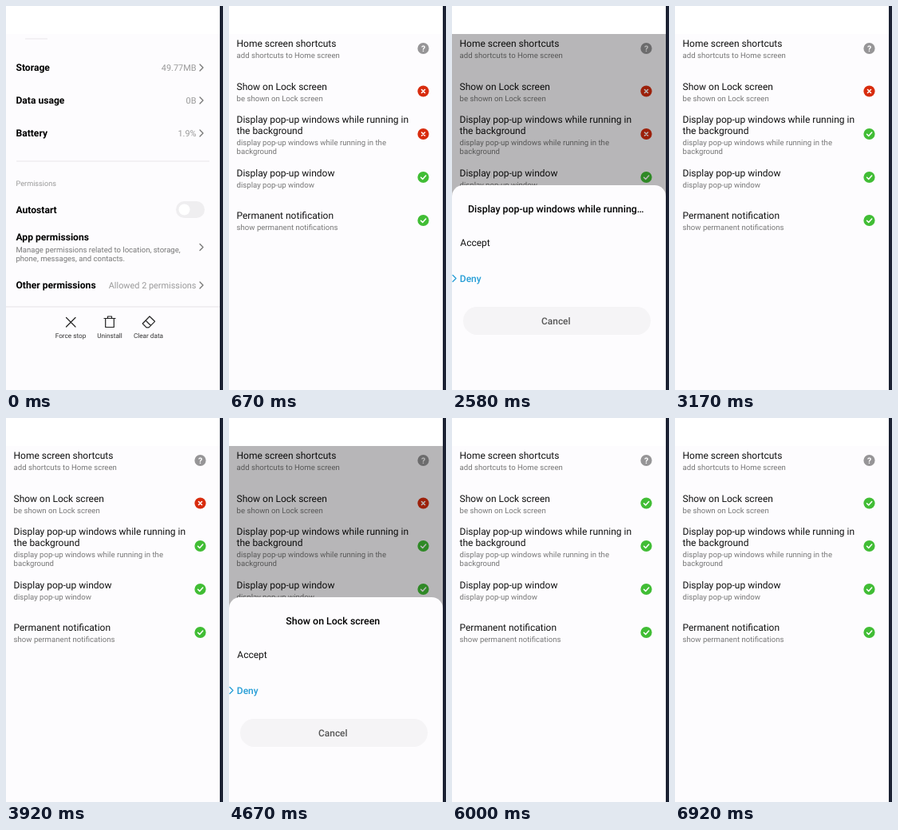
An HTML page for the animation above (7.01 s loop, 272 by 480 pixels).

```html
<!DOCTYPE html>
<html lang="en">
<head>
<meta charset="utf-8">
<title>App permissions</title>
<style>
html, body { margin: 0; width: 100%; height: 100%; overflow: hidden; background: #fff; }
svg { display: block; width: 272px; height: 480px; font-family: Roboto, sans-serif; text-rendering: geometricPrecision; }
.line { fill: none; stroke-width: 1.2; stroke-linecap: round; stroke-linejoin: round; }
</style>
</head>
<body>
<svg viewBox="0 0 272 480">
  <defs><clipPath id="view"><rect y="35" width="268" height="445"/></clipPath></defs>
  <rect width="272" height="480" fill="#fff"/>
  <g clip-path="url(#view)">
    <g id="info"></g>
    <g id="list"></g>
    <rect id="dim" y="35" width="268" height="445"/>
    <g id="sheet"></g>
  </g>
  <rect x="268" width="4" height="480" fill="#1b2132"/>
</svg>
<script>
const FRAME = 1000 / 12, LOOP = 7010;
const PAPER = '#fdfcfe', INK = '#111', GREY = '#777', PALE = '#999', BLUE = '#259dd6';
const $ = id => document.getElementById(id);

function add(parent, tag, attrs, text) {
  const el = document.createElementNS('http://www.w3.org/2000/svg', tag);
  for (const key in attrs) el.setAttribute(key, attrs[key]);
  if (text) el.textContent = text;
  return parent.appendChild(el);
}
const label = (p, x, y, text, size, fill = INK, weight = 400, anchor = 'start') =>
  add(p, 'text', { x, y, fill, 'font-size': size, 'font-weight': weight, 'text-anchor': anchor }, text);
const box = (p, x, y, width, height, fill, rx = 0) =>
  add(p, 'rect', { x, y, width, height, fill, rx });
const line = (p, d, stroke, width = 1.2) =>
  add(p, 'path', { d, stroke, class: 'line', style: `stroke-width:${width}` });
const chevron = (p, x, y, color) => line(p, `M${x} ${y - 4}l4 4-4 4`, color, 1.3);

function buildInfo(p) {
  box(p, 0, 35, 268, 445, PAPER);
  box(p, 24, 40.5, 28, 1, '#e9e7eb');
  const rows = [['Storage', 77, '49.77MB'], ['Data usage', 118, '0B'], ['Battery', 159, '1.9%'],
    ['Autostart', 255], ['App permissions', 289], ['Other permissions', 349, 'Allowed 2 permissions']];
  for (const [name, y, value] of rows) {
    label(p, 12.5, y + 4.3, name, 12.1, '#000', 700);
    if (!value) continue;
    label(p, 238.5, y + 4, value, 10.9, PALE, 400, 'end');
    chevron(p, 243, y, '#777');
  }
  box(p, 13, 193.5, 242, 1, '#e9e7eb');
  label(p, 12.5, 225.3, 'Permissions', 9.15, PALE);
  box(p, 213, 244, 36, 21, '#efeef0', 10.5);
  add(p, 'circle', { cx: 223.5, cy: 254.5, r: 7, fill: '#fff' });
  label(p, 12.5, 308.3, 'Manage permissions related to location, storage,', 9.55, GREY);
  label(p, 12.5, 319.3, 'phone, messages, and contacts.', 9.55, GREY);
  chevron(p, 243, 301.5, '#777');
  box(p, 0, 375.5, 268, 1, '#e6e4e8');
  line(p, 'M75.5 389.5l11.5 11.5M87 389.5l-11.5 11.5', '#222');
  line(p, 'M123 390.5h14M127.5 390v-2h5v2M124.7 391v10.5h10.6v-10.5', '#222');
  line(p, 'M180 388l6.5 6.3-7.5 7.5h-3l-4.8-4.8zM175 393l6.5 6.5', '#222');
  [['Force stop', 81], ['Uninstall', 130], ['Clear data', 178.5]].forEach(([text, x]) =>
    label(p, x, 415, text, 8.2, '#333', 400, 'middle'));
}

function badge(p, y, kind) {
  const g = add(p, 'g', { transform: `translate(243.5 ${y})` });
  const color = { ask: '#969597', no: '#d82c0e', yes: '#41bd35' }[kind];
  add(g, 'circle', { r: 7.1, fill: color });
  if (kind === 'ask') label(g, 0, 3.7, '?', 10.5, '#fff', 700, 'middle');
  if (kind === 'no') line(g, 'M-2 -2l4 4M2 -2l-4 4', '#fff', 1.6);
  if (kind === 'yes') line(g, 'M-3 .2l2.2 2.2 4-4.4', '#fff', 1.5);
  return g;
}

function buildList(p) {
  box(p, 0, 35, 268, 445, PAPER);
  const press = [box(p, 0, 133, 268, 55, '#ebeaec'), box(p, 0, 79, 268, 54, '#ebeaec')];
  const rows = [
    [51.2, ['Home screen shortcuts'], ['add shortcuts to Home screen']],
    [104.8, ['Show on Lock screen'], ['be shown on Lock screen']],
    [146.2, ['Display pop-up windows while running in', 'the background'],
      ['display pop-up windows while running in the', 'background']],
    [212.7, ['Display pop-up window'], ['display pop-up window']],
    [266, ['Permanent notification'], ['show permanent notifications']]];
  for (const [y, title, note] of rows) {
    title.forEach((text, i) => label(p, 9.5, y + 14 * i, text, 12));
    const top = y + 14 * title.length;
    note.forEach((text, i) => label(p, 9.6, top + 11 * i, text, 9.6, GREY));
  }
  badge(p, 53, 'ask');
  badge(p, 214, 'yes');
  badge(p, 268, 'yes');
  const marks = [160, 106.5].map(y => [badge(p, y, 'no'), badge(p, y, 'yes')]);
  return { press, marks };
}

function buildSheet(p) {
  box(p, 0, 224, 268, 300, PAPER, 14);
  const press = box(p, 0, 272.5, 268, 45.5, '#f1f0f2');
  const title = label(p, 130.3, 258, '', 12.4, '#000', 500, 'middle');
  label(p, 10.3, 300.3, 'Accept', 12);
  label(p, 9.8, 345.3, 'Deny', 12, BLUE, 500);
  chevron(p, 1, 340.5, BLUE);
  box(p, 14, 376, 235, 35, '#f5f4f6', 17.5);
  label(p, 130.3, 397.8, 'Cancel', 11.9, '#555', 500, 'middle');
  return { press, title };
}

buildInfo($('info'));
const list = buildList($('list'));
const sheet = buildSheet($('sheet'));

// Times in ticks of 1/12 s.
const visits = [
  { title: 'Display pop-up windows while running…', tap: 19, open: 21, accept: 33, close: 35 },
  { title: 'Show on Lock screen', tap: 52, open: 53, accept: 64, close: 66 }];

const ramp = (t, from, to) => Math.min(1, Math.max(0, (t - from) / (to - from)));
const easeOut = p => 1 - (1 - p) ** 2.4;
const show = (el, on) => el.setAttribute('visibility', on ? 'visible' : 'hidden');
const move = (el, x, y) => el.setAttribute('transform', `translate(${x} ${y})`);

function draw(ms) {
  const t = Math.floor((ms % LOOP + 3.5) / FRAME);
  const slide = easeOut(ramp(t, 0, 4));
  move($('info'), -67 * slide, 0);
  move($('list'), 268 * (1 - slide), 0);

  let up = 0, held = false;
  visits.forEach((v, i) => {
    const level = easeOut(ramp(t, v.open, v.open + 3)) - ramp(t, v.close, v.close + 3) ** 2.37;
    if (level > 0) {
      up = level;
      sheet.title.textContent = v.title;
      held = t >= v.accept;
    }
    const done = t >= v.close + 3;
    show(list.press[i], t >= v.tap && t <= v.open);
    show(list.marks[i][0], !done);
    show(list.marks[i][1], done);
  });
  show(sheet.press, held);
  move($('sheet'), 0, 256 * (1 - up));
  $('dim').setAttribute('opacity', 0.28 * up);
}

const start = performance.now();
function tick() {
  draw(performance.now() - start);
  requestAnimationFrame(tick);
}
tick();
</script>
</body>
</html>
```
